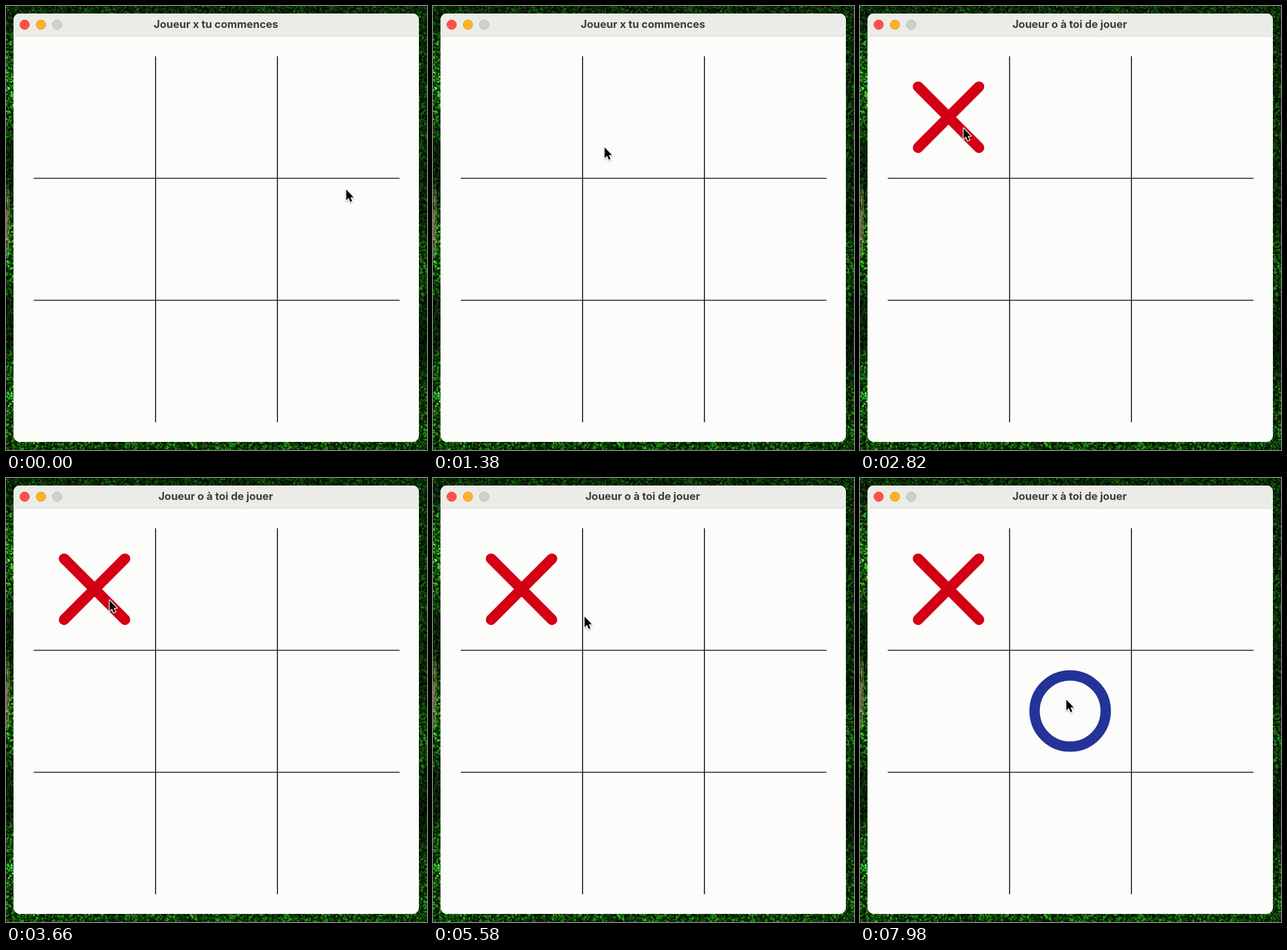
An HTML page with a canvas that plays this animation: 729x768 px, repeating every 8000 ms.

```html
<!DOCTYPE html>
<html lang="fr">
<head>
<meta charset="utf-8">
<title>Morpion</title>
<style>
  html, body { margin: 0; width: 100%; height: 100%; overflow: hidden; background: #0a260a; }
  canvas, svg { position: absolute; left: 0; top: 0; width: 729px; height: 768px; }
  .title { font: 700 18.4px Inter, "Open Sans", sans-serif; fill: #3c3c3b; text-anchor: middle; }
  .grid { stroke: #151515; stroke-width: 1.7; }
  .start, .second, .third, .cross, .ring { animation: 8s step-end infinite; }
  .start { animation-name: start; }
  .second { animation-name: second; }
  .third, .ring { animation-name: third; }
  .cross { animation-name: cross; }
  .pointer { animation: move 8s ease-out infinite; }

  @keyframes start { 33.75%, 100% { opacity: 0 } }
  @keyframes cross { 0% { opacity: 0 } 33.75%, 100% { opacity: 1 } }
  @keyframes second { 0%, 93.75%, 100% { opacity: 0 } 33.75% { opacity: 1 } }
  @keyframes third { 0% { opacity: 0 } 93.75%, 100% { opacity: 1 } }
  @keyframes move {
    0% { transform: translate(589px, 317px); animation-timing-function: linear; }
    17.25% { transform: translate(297px, 244px); animation-timing-function: linear; }
    24.75% { transform: translate(209px, 225px); }
    31%, 60% { transform: translate(179px, 211px); animation-timing-function: ease-in; }
    69.75% { transform: translate(262px, 239px); }
    87.25% { transform: translate(353px, 374px); }
    93%, 100% { transform: translate(357px, 383px); }
  }
</style>
</head>
<body>
<canvas width="729" height="768"></canvas>
<svg viewBox="0 0 729 768">
  <defs>
    <filter id="shade" x="-60%" y="-40%" width="240%" height="200%">
      <feDropShadow dx="0" dy="1.5" stdDeviation="1.3" flood-opacity=".35"/>
    </filter>
  </defs>
  <rect x="13" y="13" width="702" height="741" rx="11" fill="#fcfdfb"/>
  <path d="M13 52V24a11 11 0 0 1 11-11H704a11 11 0 0 1 11 11V52Z" fill="#ebece7"/>
  <path d="M13 52.5H715" stroke="#d9dad8"/>
  <circle cx="32.3" cy="32.3" r="8.2" fill="#ff5149" stroke="#e2443d"/>
  <circle cx="60.5" cy="32.3" r="8.2" fill="#fdb224" stroke="#df9b1c"/>
  <circle cx="88.6" cy="32.3" r="8.2" fill="#cfd0ca" stroke="#b9bab5"/>
  <g class="title">
    <text class="start" x="363.5" y="38">Joueur x tu commences</text>
    <text class="second" x="363.2" y="38">Joueur o à toi de jouer</text>
    <text class="third" x="363" y="38">Joueur x à toi de jouer</text>
  </g>
  <path class="grid" d="M259 87V720M470 87V720M48 298H681.5M48 509H681.5"/>
  <path class="cross" d="M100.6 139.6L206 245M206 139.6L100.6 245" stroke="#d30015" stroke-width="18.4" stroke-linecap="round"/>
  <circle class="ring" cx="363.9" cy="403" r="61.6" fill="none" stroke="#243398" stroke-width="18"/>
  <g class="pointer">
    <path d="M.3.5V19L4.6 15 7.5 21.9 10.5 20.6 7.6 13.8H13Z" stroke="#fff"
      stroke-width="2.6" paint-order="stroke" stroke-linejoin="round" filter="url(#shade)"/>
  </g>
</svg>
<script>
  const ctx = document.querySelector('canvas').getContext('2d');
  const { width, height } = ctx.canvas;
  const border = 15;
  let seed = 41;
  const random = () => (seed = seed * 16807 % 2147483647) / 2147483647;

  // Sunlit and shaded foliage alternate down the sides; the upper right stays dark.
  function lightness(x, y) {
    if (y < border) return 10;
    if (y > height - border) return 16;
    const right = x > width / 2;
    const wave = Math.cos((y - (right ? 165 : 135)) / 275 * 2 * Math.PI);
    return right ? 11 + 6 * wave * Math.min(1, y / 400) ** 3 : 16 + 9 * wave;
  }

  function leaf(x, y) {
    const light = lightness(x, y) * (.15 + 2.5 * random() ** 2);
    ctx.fillStyle = `hsl(${100 + random() * 25} 75% ${light}%)`;
    ctx.beginPath();
    ctx.ellipse(x, y, 1 + random() * 2, .6 + random() * 1.4, random() * Math.PI, 0, 2 * Math.PI);
    ctx.fill();
  }

  for (let i = 0; i < 9000; i++) {
    const along = random(), across = random() * border;
    const far = random() < .5;
    if (random() < .5) leaf(far ? width - across : across, along * height);
    else leaf(along * width, far ? height - across : across);
  }

  // Pale bark at the left edge.
  for (let i = 0; i < 40; i++) {
    ctx.fillStyle = `hsl(55 25% ${20 + random() * 40}%)`;
    ctx.fillRect(random() * 6, 300 + random() * 120, 1, 8 + random() * 20);
  }
</script>
</body>
</html>
```
